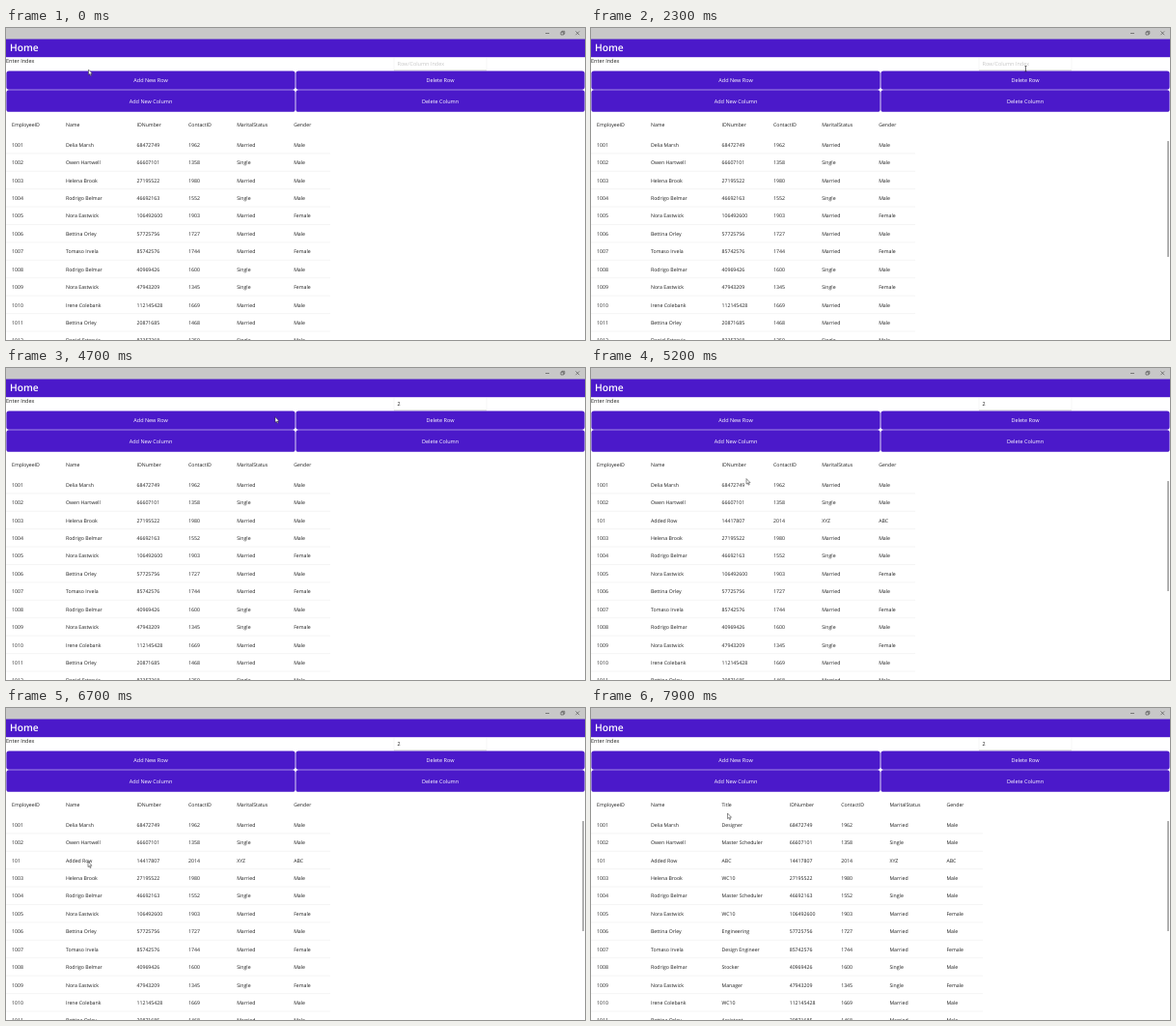
An HTML page for the animation above (8000 ms loop, 600 by 323 pixels).

```html
<!DOCTYPE html>
<html>
<head>
<meta charset="utf-8">
<style>
html, body { margin: 0; width: 100%; height: 100%; overflow: hidden; background: #fff; }
svg { display: block; width: 600px; height: 323px; font: 5.2px "Open Sans", "Noto Sans", sans-serif; fill: #1c1c1c; text-rendering: geometricPrecision; }
.ui { font-size: 5.5px; }
.bar { fill: #4b19ca; }
.label { fill: #fff; text-anchor: middle; }
</style>
</head>
<body>
<svg viewBox="0 0 600 323">
  <rect width="600" height="12" fill="#c8c8c8"/>
  <g fill="none" stroke="#444" stroke-width=".6">
    <path d="M559 5.5h4M590.4 3.4l3.8 3.8m0-3.8l-3.8 3.8"/>
    <path d="M575 4.2h2.8v2.8h-2.8zM576 4.2v-.9h2.8v2.8h-.9"/>
  </g>
  <rect class="bar" y="11.5" width="600" height="18.7"/>
  <text x="4" y="23.6" font-size="10.3" font-weight="600" fill="#fff">Home</text>
  <text class="ui" x="0" y="36.4">Enter Index</text>
  <path d="M402 31v12.6M498 31v12.6" stroke="#f1f1f1" stroke-width=".6"/>
  <path d="M402 43.8h96" stroke="#b8b8b8" stroke-width=".6"/>
  <text class="ui" id="entry" x="405.5" y="38.7"></text>
  <g id="buttons"></g>
  <g id="tables"></g>
  <rect id="scroll" x="597.4" y="117" width="1.3" rx=".6" fill="#858585"/>
  <path id="arrow" d="M0 0V5.6L1.3 4.5 2.2 6.6 3.1 6.2 2.2 4.2H4Z" fill="#fff" stroke="#222" stroke-width=".5"/>
  <path id="beam" d="M-1-2.7H1M0-2.7V2.7M-1 2.7H1" fill="none" stroke="#222" stroke-width=".6"/>
</svg>
<script>
const $ = id => document.getElementById(id);
const text = (x, y, s, cls = "") => `<text class="${cls}" x="${x}" y="${y}">${s}</text>`;

const button = (x, y, h, label) =>
  `<rect class="bar" x="${x + .4}" y="${y}" width="299.2" height="${h}" rx="2.6"/>` +
  text(x + 150, y + h / 2 + 2, label, "ui label");
$("buttons").innerHTML =
  button(0, 44.4, 19.3, "Add New Row") + button(300, 44.4, 19.3, "Delete Row") +
  button(0, 64.2, 22.6, "Add New Column") + button(300, 64.2, 22.6, "Delete Column");

const head = ["EmployeeID", "Name", "IDNumber", "ContactID", "MaritalStatus", "Gender"];
const rows = `1001,Delia Marsh,68472749,1962,Married,Male
1002,Owen Hartwell,66607101,1358,Single,Male
1003,Helena Brook,27195522,1980,Married,Male
1004,Rodrigo Belmar,46692163,1552,Single,Male
1005,Nora Eastwick,106492600,1903,Married,Female
1006,Bettina Orley,57725756,1727,Married,Male
1007,Tomaso Irvela,85742576,1744,Married,Female
1008,Rodrigo Belmar,40969426,1600,Single,Male
1009,Nora Eastwick,47943209,1345,Single,Female
1010,Irene Colebank,112145428,1669,Married,Male
1011,Bettina Orley,20871685,1468,Married,Male
1012,Daniel Estrovia,82357268,1250,Single,Male`.split("\n").map(r => r.split(","));
const moreRows = rows.toSpliced(2, 0, ["101", "Added Row", "14417807", "2014", "XYZ", "ABC"]);
const titles = ["Title", "Designer", "Master Scheduler", "ABC", "WC10", "Master Scheduler", "WC10",
  "Engineering", "Design Engineer", "Stocker", "Manager", "WC10", "Assistant", "Designer"];
const cols = [6, 62, 135.5, 189, 239.2, 298.2];
const wideCols = [...cols.slice(0, 3), ...cols.slice(2).map(x => x + 70.2)];

const PITCH = 18.42;
function table(data, xs, width) {
  const line = (r, y) => r.map((s, i) => text(xs[i], y, s)).join("");
  return "<g>" + data.map((r, i) => i
    ? line(r, 122.8 + (i - 1) * PITCH) + `<path d="M0 ${111.4 + i * PITCH}H${width}" stroke="#efefef" stroke-width=".6"/>`
    : line(r, 102.4)).join("") + "</g>";
}
const grown = [head, ...moreRows];
$("tables").innerHTML = table([head, ...rows], cols, 336) + table(grown, cols, 336) +
  table(grown.map((r, i) => r.toSpliced(2, 0, titles[i])), wideCols, 406);
const tables = [...$("tables").children];

// Pointer path: time, x, y
const path = [
  [0, 85.5, 43], [600, 73, 152], [1100, 73, 152], [1500, 450.5, 160.5], [1700, 451, 160],
  [2000, 467, 62], [2200, 450.5, 42.2], [3900, 450.5, 42.2], [4600, 279, 50.7], [4800, 279, 50.7],
  [5500, 84.5, 156], [6000, 84.5, 156], [6300, 86, 161], [6700, 85, 159],
  [7400, 164, 75], [7600, 164, 75], [7900, 141.5, 109], [8000, 141.5, 109]
];
function pointer(t) {
  const i = path.findIndex(p => p[0] > t);
  const [a, b] = [path[i - 1], path[i]];
  const u = (t - a[0]) / (b[0] - a[0]), k = u * u * (3 - 2 * u);
  return [a[1] + (b[1] - a[1]) * k, a[2] + (b[2] - a[2]) * k];
}
const show = (el, on) => el.style.display = on ? "" : "none";

function draw(now) {
  const t = Math.floor(now % 8000 / 100) * 100;
  const stage = t < 4800 ? 0 : t < 7700 ? 1 : 2;
  tables.forEach((g, i) => show(g, i === stage));

  const typed = t >= 3200;
  $("entry").textContent = typed ? "2" : "Row/Column Index";
  $("entry").style.fill = typed ? "#1c1c1c" : "#c6c6c6";

  const fade = Math.max(0, Math.min(1, (3800 - t) / 300));
  $("scroll").style.opacity = t < 1300 ? 0 : t < 5200 ? fade : 1;
  $("scroll").setAttribute("height", stage ? 114 : 120);

  const [x, y] = pointer(t), inEntry = x > 402 && x < 498 && y < 44;
  for (const id of ["arrow", "beam"]) {
    $(id).setAttribute("transform", `translate(${x} ${y})`);
    show($(id), (id === "beam") === inEntry);
  }
  requestAnimationFrame(draw);
}
draw(performance.now());
</script>
</body>
</html>
```
